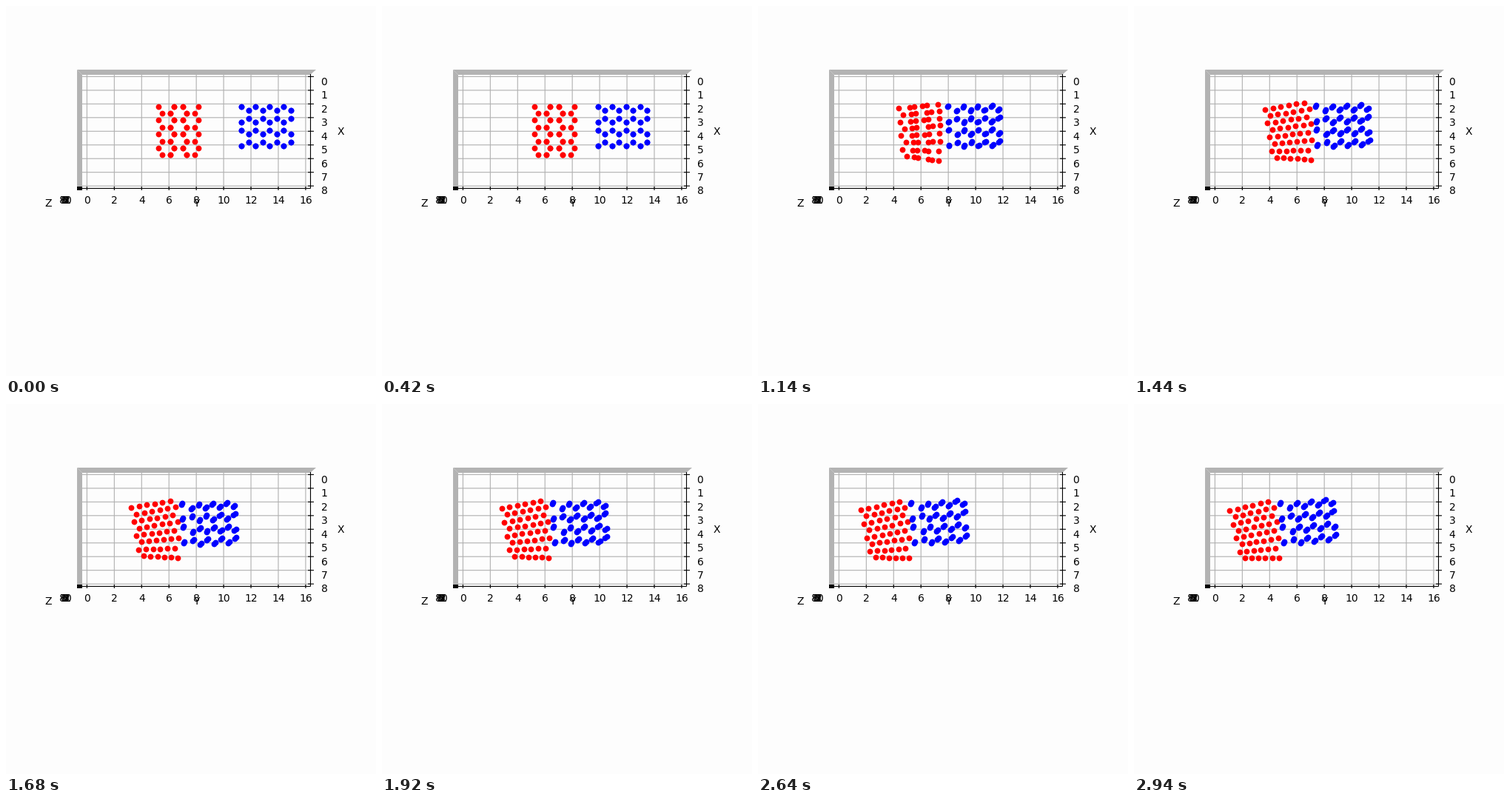
Animation of 500x500 px, one loop 3000 ms. Source, as a matplotlib script:

```python
import numpy as np
import matplotlib.pyplot as plt
from matplotlib.animation import FuncAnimation

FRAMES, STEP = 50, 60
GRID, BAND, BG = "#b0b0b0", "#b3b3b3", "#fdfdfd"
UNIT = 18.47
CONTACT, HIT, SETTLED = 0.6, 0.78, 1.44   # seconds

fig = plt.figure(figsize=(5, 5), dpi=100, facecolor=BG)
ax = fig.add_axes([0, 0, 1, 1])
ax.set_xlim(0, 500)
ax.set_ylim(500, 0)
ax.axis("off")


def line(xs, ys, color=GRID, z=1):
    ax.plot(xs, ys, color=color, lw=0.8, zorder=z, snap=False,
            solid_capstyle="butt")


def label(x, y, text):
    ax.text(x, y, str(text), size=10, family="DejaVu Sans",
            ha="center", va="center_baseline", zorder=6)


def draw_box():
    left, right, top, bottom = 103, 411.5, 93, 246.5
    ax.fill([96, 419, 411, left], [86, 86, top, top], color=BAND, lw=0)
    ax.fill([96, left, left, 96], [86, top, bottom, bottom], color=BAND, lw=0)
    for k in range(9):
        x, y = 109.4 + 2 * k * UNIT, 95.4 + k * UNIT
        line([x, x], [top, bottom])
        line([left, right], [y, y])
        line([x, x], [244, 249], "black", 2)
        line([408, 416], [y, y], "black", 2)
        label(x + 0.5, 261.5, 2 * k)
        label(430, y + 5.8, k)
        label(84 - 0.95 * k, 261.5, k)
    line([96, right], [bottom, bottom], "black", 2)
    line([right, right], [top - 1, bottom], "black", 2)
    ax.fill([96, 103, 103, 96], [244, 244, 249, 249], color="black", lw=0, zorder=2)
    label(257, 265.5, "Y")
    label(57.5, 265.5, "Z")
    label(452, 168.5, "X")


def turn(p, angle):
    c, s = np.cos(angle), np.sin(angle)
    return p @ np.array([[c, s], [-s, c]])


def ramp(t, start, end):
    return np.clip((t - start) / (end - start), 0, 1)


# Red block: rows of paired sites that loosen into a tilted hexagonal packing
RED_MID = np.array([210, 170])
row, col = (a.ravel() for a in np.mgrid[0:8, 0:6])
odd = row % 4 % 2
site = np.round(col * 3 / 5)
side = np.sign(site - 1.5)
outer = np.abs(site - 1.5) > 1
reach = np.where(outer, 27 - 5 * odd, 6 + 5 * odd)
red_rest = np.column_stack([232.5 + side * reach, 135.7 + 9.37 * row])

hexagonal = np.column_stack([10.7 * (col + odd / 2), 9.55 * row])
slump = 12 * (col / 5) * (row / 7) ** 3
slump = np.column_stack([-0.6 * slump, slump])
red_loose = turn(hexagonal, -0.165) + (177, 139.5) + slump
red_hit = red_rest + 0.7 * slump + 0.1 * (red_loose - red_rest + (23, -2))


def red_at(t):
    p = red_rest + ramp(t, CONTACT, HIT) * (red_hit - red_rest)
    p = p + ramp(t, HIT, SETTLED) * (red_loose - red_hit)
    k = max(0, t - SETTLED) / 1.5
    return turn(p - RED_MID, -0.07 * k) + RED_MID + k * np.array([-45.7, 2.3])


# Blue block: incoming zigzag crystal, two layers deep
bcol, brow, layer = (a.ravel() for a in np.mgrid[0:8, 0:4, 0:2])
layer = layer - 0.5
blue_rest = np.column_stack([9.5 * (bcol - 4),
                             16 * (brow - 1.5) - 2.5 * (-1) ** (bcol + brow)])
split = np.column_stack([layer * (1 + 0.25 * bcol), -2 * layer])
dent = np.outer(bcol == 0, (-3.5, -2))   # leading face is pushed back


def blue_at(t):
    x = max(356.4 - 63.4 * t, 332.6 - 31 * t)
    y = 162.5 - 2 * max(0, t - 1)
    body = turn(blue_rest, -0.045 * max(0, t - CONTACT))
    loosen = (ramp(t, 0.3, HIT) + ramp(t, HIT, SETTLED)) / 2
    return body + (x, y) + loosen * split + ramp(t, HIT, SETTLED) * dent


draw_box()
size = (7.8 * 72 / 100) ** 2
red = ax.scatter(*red_at(0).T, s=size, c="#ff0000", lw=0, zorder=4)
blue = ax.scatter(*blue_at(0).T, s=size, c="#0000ff", lw=0, zorder=5)


def update(i):
    t = i * STEP / 1000
    red.set_offsets(red_at(t))
    blue.set_offsets(blue_at(t))
    return red, blue


anim = FuncAnimation(fig, update, frames=FRAMES, interval=STEP,
                     repeat=True, repeat_delay=0)
plt.show()
```
